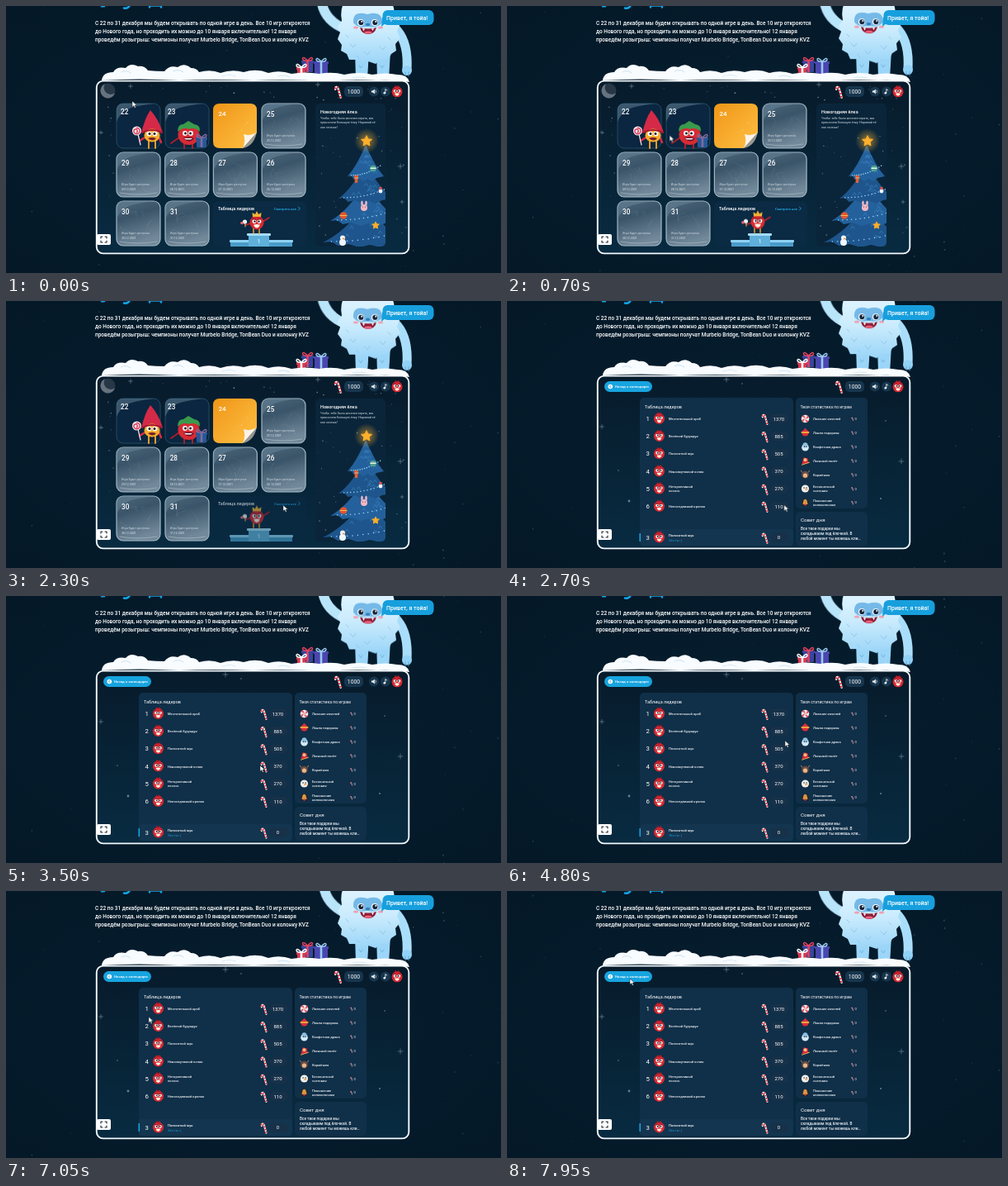
These frames come from a looping animation (600 px wide and 323 px high, 8 s). An HTML page:

```html
<!DOCTYPE html>
<html lang="ru">
<head>
<meta charset="utf-8">
<title>Новогодний календарь</title>
<style>
html, body { margin: 0; width: 100%; height: 100%; overflow: hidden; background: #051a29; }
svg { display: block; width: 100vw; height: 100vh; font-family: Roboto, Inter, sans-serif; }
</style>
</head>
<body>
<svg id="stage" viewBox="0 0 600 323" preserveAspectRatio="none">
  <defs>
    <radialGradient id="page" cx=".5" cy=".5" r=".7">
      <stop stop-color="#061f30"/><stop offset="1" stop-color="#041827"/>
    </radialGradient>
    <linearGradient id="panel" x2="0" y2="1">
      <stop stop-color="#071b2b"/><stop offset="1" stop-color="#082b41"/>
    </linearGradient>
    <linearGradient id="ice" x2=".3" y2="1">
      <stop stop-color="#4d6679"/><stop offset=".4" stop-color="#3a5469"/><stop offset="1" stop-color="#72899a"/>
    </linearGradient>
    <linearGradient id="gold" x2="1" y2="1">
      <stop stop-color="#ef9617"/><stop offset="1" stop-color="#ffc044"/>
    </linearGradient>
    <linearGradient id="fur" x2="0" y2="1">
      <stop stop-color="#e3f6ff"/><stop offset=".5" stop-color="#cbecfd"/><stop offset="1" stop-color="#9bd5f8"/>
    </linearGradient>
    <radialGradient id="glow">
      <stop stop-color="#ffb52e" stop-opacity=".6"/><stop offset="1" stop-color="#ffb52e" stop-opacity="0"/>
    </radialGradient>
    <clipPath id="treeClip"><rect x="375" y="118" width="85" height="173" rx="5"/></clipPath>
  </defs>
</svg>
<script>
const LOOP = 8000, SWITCH = 2650;
const stage = document.getElementById('stage');

let seed = 7;
const rnd = (a = 0, b = 1) => {
  seed = (seed * 16807) % 2147483647;
  return +(a + (b - a) * seed / 2147483647).toFixed(2);
};
const times = (n, fn) => Array.from({ length: n }, (_, i) => fn(i)).join('');

const rect = (x, y, w, h, r, fill, more = '') =>
  `<rect x="${x}" y="${y}" width="${w}" height="${h}" rx="${r}" fill="${fill}" ${more}/>`;
const dot = (x, y, r, fill, more = '') =>
  `<circle cx="${x}" cy="${y}" r="${r}" fill="${fill}" ${more}/>`;
const oval = (x, y, rx, ry, fill) =>
  `<ellipse cx="${x}" cy="${y}" rx="${rx}" ry="${ry}" fill="${fill}"/>`;
const path = (d, fill, more = '') => `<path d="${d}" fill="${fill}" ${more}/>`;
const line = (d, stroke, w = 1) =>
  `<path d="${d}" fill="none" stroke="${stroke}" stroke-width="${w}" stroke-linecap="round" stroke-linejoin="round"/>`;
const text = (x, y, size, str, fill = '#fff', weight = 400, more = '') =>
  `<text x="${x}" y="${y}" font-size="${size}" fill="${fill}" font-weight="${weight}" ${more}>${str}</text>`;
const group = (body, attrs = '') => `<g ${attrs}>${body}</g>`;
const at = (x, y, body, scale = 1) => group(body, `transform="translate(${x} ${y}) scale(${scale})"`);
const spark = (x, y, r = 2.5) =>
  line(`M${x - r} ${y}h${2 * r}M${x} ${y - r}v${2 * r}`, '#7892a3', .6);
const star = (x, y, r, fill) => path('M' + Array.from({ length: 10 }, (_, i) => {
  const a = i * Math.PI / 5 - Math.PI / 2, q = i % 2 ? r * .48 : r;
  return `${(x + q * Math.cos(a)).toFixed(1)} ${(y + q * Math.sin(a)).toFixed(1)}`;
}).join('L') + 'Z', fill, `stroke="${fill}" stroke-linejoin="round"`);
const specks = (n, [x0, x1], [y0, y1], fill, size = .8) => times(n, () =>
  dot(rnd(x0, x1), rnd(y0, y1), rnd(.3, size), fill, `opacity="${rnd(.2, .8)}"`));

const cane = (x, y, s = 1) => {
  const d = 'M1.5 7L-1 -2C-2 -6 -5 -5 -4.4 -2';
  return at(x, y, line(d, '#f7f2f0', 2.2) +
    `<path d="${d}" fill="none" stroke="#e43342" stroke-width="2.2" stroke-dasharray="1.8 1.7"/>`, s);
};

// Round red fruit face, shared by avatars and the podium hero
const face = (x, y, s = 1) => at(x, y,
  dot(0, 0, 6.5, '#d92931') + path('M-3 -5L-2 -8 0 -6 2 -8 3 -5Z', '#b81c29') +
  dot(-2.3, -1, 1.9, '#fff') + dot(2.3, -1, 1.9, '#fff') +
  dot(-1.9, -1, .9, '#1a1420') + dot(1.9, -1, .9, '#1a1420') +
  path('M-3 2Q0 1 3 2Q2 5 0 5Q-2 5 -3 2Z', '#fff3e6') + line('M-4 -3.6L-1 -2.8M4 -3.6L1 -2.8', '#761020', .8), s);

const gift = (x, y, w, h, fill, ribbon) =>
  rect(x, y, w, h, 1, fill) + rect(x + w / 2 - 1.3, y, 2.6, h, 0, ribbon) +
  rect(x - 1, y, w + 2, 3, .6, fill) + rect(x + w / 2 - 1.3, y, 2.6, 3, 0, ribbon) +
  line(`M${x + w / 2} ${y}q-6 -6 -6 -2q1 3 6 2q6 -6 6 -2q-1 3 -6 2`, ribbon, 1.4);

function backdrop() {
  const layer = specks(60, [0, 600], [0, 323], '#5d7c92');
  const intro = [
    'С 22 по 31 декабря мы будем открывать по одной игре в день. Все 10 игр откроются',
    'до Нового года, но проходить их можно до 10 января включительно! 12 января',
    'проведём розыгрыш: чемпионы получат Murbelo Bridge, TonBean Duo и колонку KVZ'
  ];
  return rect(0, 0, 600, 323, 0, 'url(#page)') +
    group(layer + at(0, -323, layer), 'id="snow"') +
    line('M116 .3h3M143 2.5Q148 3.5 150 -1M174 1.5v-2h14v2', '#13a5e5', 2.4) +
    intro.map((s, i) => text(108, 22.5 + i * 10, 6.48, s, '#fff', 500)).join('');
}

function yeti() {
  const eye = x => dot(x, 20, 4, '#fff') + dot(x + .3, 20, 3.1, '#13253f') + dot(x + 1.3, 18.8, 1.1, '#fff');
  const leg = x => path(`M${x} 55L${x + 1} 88H${x + 15}L${x + 17} 55Z`, '#9bd5f8') +
    line(`M${x + 5} 72l2 3 2-3`, '#68b1df', .8);
  return group(
    line('M471 26Q488 42 486 76', '#a9defb', 11) + dot(486, 78, 6, '#92d2f7') +
    line('M484 80v5M488 80v5', '#589ecf', .8) +
    group(line('M384 -4Q388 18 412 28', '#b9e5fb', 12), 'id="arm"') +
    leg(423) + leg(449) +
    path('M412 -10Q404 4 407 18L402 25 405 32 402 40 407 47 406 54 413 58 416 65 424 65 430 70 439 67 448 70 455 65 463 65 467 58 473 54 472 46 478 39 474 31 477 23 471 16Q472 0 464 -10Z', 'url(#fur)') +
    line('M417 46l4 4 3-4M434 55l4 4 3-4M453 49l4 4 3-4M425 60l3 3M463 38l3 3M412 35l3 3', '#86c4e9', .8) +
    path('M421 20Q420 5 438 10Q456 5 456 20Q452 27 438 25Q425 27 421 20Z', '#74b9e8') +
    eye(430) + eye(447) + oval(438.5, 22.5, 2.8, 1.8, '#357eb9') +
    path('M429 26Q439 29 449 26Q447 34 439 34Q431 34 429 26Z', '#8e1c38') +
    oval(439, 32, 4.5, 1.6, '#ef667d') +
    path('M432 27l3 .5 -1.5 3ZM443 27.5l3 -.5 -1.5 3Z', '#fff') +
    oval(424, 26, 3, 1.5, '#f0a0b4') + oval(454, 26, 3, 1.5, '#f0a0b4'), 'id="yeti"') +
    rect(456.5, 5, 62, 18, 6, '#179fdd') + path('M461 20l-6 5 1 -12Z', '#179fdd') +
    text(461, 16.5, 7, 'Привет, я тойа!', '#fff', 500);
}

function snowCap() {
  return gift(359, 66, 13, 14, '#39459d', '#e34260') + gift(374, 67, 16, 15, '#4a46b0', '#9cc9f0') +
    gift(353, 74, 10, 9, '#d8384e', '#fff') +
    path('M116 90Q117 80 130 80Q134 73 145 75Q151 68 160 73Q168 72 172 78Q182 79 192 79Q198 71 208 74Q216 68 224 75Q231 75 234 80Q248 76 260 81Q274 76 288 80Q304 75 318 81Q332 77 346 82Q362 79 380 82Q396 79 410 83Q428 79 444 83Q460 80 474 83Q487 83 489 92Q470 89 450 90Q420 88 390 91Q340 88 300 90Q250 88 210 90Q160 87 116 90Z', '#f8fcff') +
    line('M140 80q6 -3 11 1M203 79q7 -3 12 1M262 85q9 -3 16 0M330 85q8 -2 14 1M420 87q9 -2 16 0', '#d7e8f4', 1.2);
}

function header() {
  return cane(404, 103, 1.1) + rect(410, 97, 23, 13, 5, '#17364e') +
    text(421.5, 106, 6.8, '1000', '#fff', 400, 'text-anchor="middle"') +
    dot(446, 103.5, 6, '#17364e') + path('M443 102.5h1.8l2 -2v6l-2 -2h-1.8Z', '#fff') +
    line('M448 102q1 1.5 0 3', '#fff', .7) +
    dot(460, 103.5, 6, '#17364e') + dot(458.8, 105.3, 1.3, '#fff') + line('M459.8 105v-4.5l2 1.5', '#fff', .8) +
    face(474, 103.8);
}

// Pale ice along the rim of a tile, thicker in the upper left corner
const frost = (x, y) =>
  path(`M${x} ${y + 22}V${y + 8}Q${x} ${y} ${x + 8} ${y}H${x + 45}Q${x + 30} ${y + 2} ${x + 22} ${y + 4}Q${x + 6} ${y + 7} ${x} ${y + 22}Z`, '#6b879b', 'opacity=".5"');

function iceTile(x, y, day) {
  const cracks = times(6, () =>
    line(`M${x + rnd(10, 42)} ${y + rnd(12, 40)}l${rnd(-9, 9)} ${rnd(-9, 9)} ${rnd(-6, 6)} ${rnd(2, 8)}`, 'rgba(190,210,224,.2)', .4));
  return rect(x, y, 53, 54, 8, 'url(#ice)', 'stroke="#a3b7c5" stroke-width="1.2"') +
    frost(x, y) + cracks +
    line(`M${x + 4} ${y + 49}Q${x + 26} ${y + 53} ${x + 49} ${y + 49}`, 'rgba(225,237,245,.35)', 1) +
    text(x + 6, y + 15.5, 8.2, day, '#fff', 500) +
    text(x + 6, y + 39.8, 3.5, 'Игра будет доступна', '#cbd7df') +
    text(x + 6, y + 45.6, 3.5, `${day}.12.2021`, '#e4ebf0');
}

function openTiles() {
  const eyes = (x, y) => dot(x - 3.5, y, 3, '#fff') + dot(x + 3.5, y, 3, '#fff') +
    dot(x - 3, y, 1.5, '#241920') + dot(x + 3, y, 1.5, '#241920');
  const gnome =
    line('M173 163v9M181 163v9', '#e79a29', 2) + line('M170 158L162 163M185 158L188 165', '#d72a42', 2.5) +
    path('M164 154Q168 136 175 126Q185 137 190 153Q178 147 164 154Z', '#d42a48') +
    oval(177, 156.5, 9.5, 8, '#f6ad2c') + eyes(177, 154.5) +
    path('M172 160q5 -2 10 0q-4 5 -10 0Z', '#71202a') +
    line('M165 153Q177 147 189 153', '#a91733', 2.2) +
    line('M160 155L163 168', '#f5e7e4', 1.2) + dot(158.5, 151, 5.5, '#f4e8ec') +
    line('M158.5 147.5a3.6 3.6 0 1 1 -3.6 3.6a2.2 2.2 0 1 1 3.6 1.8', '#dd3855', 1.4);
  const berry =
    line('M210 159L200 166', '#a51f2b', 2) + line('M216 166v6M226 166v6', '#a51f2b', 2) +
    oval(221.5, 156, 13, 12, '#d72b35') +
    path('M208 152Q208 143 215 143L221 139 228 143Q236 144 235 152Q228 146 222 149Q215 146 208 152Z', '#3a9a4c') +
    eyes(220.5, 154) +
    path('M215 160Q221 157 228 160Q223 167 215 160Z', '#62142b') + path('M216 160h10l-2 1.5h-6Z', '#fff') +
    gift(231, 159, 12, 12, '#255896', '#806a9d');
  const rim = 'stroke="#28506c" stroke-width=".9"';
  return rect(134, 118, 53, 54, 8, '#0b2640', rim) + frost(134, 118) + gnome + text(139, 130.5, 8.2, '22', '#fff', 500) +
    rect(193, 118, 53, 54, 8, '#0b2640', rim) + frost(193, 118) + berry + text(196, 130.5, 8.2, '23', '#fff', 500) +
    path('M259 118H296Q304 118 304 126V153L287 172H259Q251 172 251 164V126Q251 118 259 118Z', 'url(#gold)') +
    specks(10, [256, 298], [140, 166], '#fff0c0', .7) +
    path('M304 153Q296 158 288 155Q291 164 287 172Z', '#f9f4e9') +
    path('M304 153L287 172Q300 170 304 153Z', '#d3c9bc', 'opacity=".7"') +
    text(257.5, 132.5, 8, '24', '#fff', 500);
}

function leaderCard() {
  const hero =
    line('M297 263L290 265M311 261L319 256', '#c3212c', 1.5) + line('M300 269v6M307 269v6', '#e79a29', 1.6) +
    face(304, 262, 1.3) + path('M299 255L298.5 250 302 252 304 248 306 252 309.5 250 309 255Z', '#f2b336') +
    dot(289.5, 261, 2.6, '#eef5fb') + dot(286, 262.5, 1.8, '#ed6a72') + line('M290 263v4', '#e8bd67', 1);
  return group(rect(251, 236, 113, 55, 6, '#0b2a43') +
    text(257, 247, 5.4, 'Таблица лидеров', '#fff', 500) +
    text(325, 246.5, 4.2, 'Смотреть все', '#22b2f0', 500) + line('M354.5 243l1.8 2 -1.8 2', '#22b2f0', .8) +
    rect(272, 284, 75, 7, 0, '#4a9cc9') + rect(271, 283, 77, 3, 1, '#8ed2f3') +
    rect(294, 277, 25, 14, 0, '#5fb0da') + rect(292, 275, 29, 3, 1, '#a4dcf6') +
    text(306.5, 287, 8, '1', '#c2e9fb', 500, 'text-anchor="middle"') +
    group(hero, 'id="hero"'), 'id="leaders"');
}

function treeCard() {
  const tiers = [[288, 240, 52], [262, 214, 43], [235, 190, 33], [208, 168, 22]];
  const tree = tiers.map(([y, top, half], i) => {
    const px = k => (436 + half * k).toFixed(1);
    return path(`M436 ${top}Q${px(-.5)} ${y - 14} ${px(-1)} ${y - 2}L${px(-.8)} ${y - 3} ${px(-.65)} ${y + 2} ${px(-.4)} ${y} ${px(-.15)} ${y + 4} ${px(.1)} ${y + 1} ${px(.35)} ${y + 4} ${px(.6)} ${y} ${px(1)} ${y - 2}Q${px(.5)} ${y - 14} 436 ${top}Z`,
      i % 2 ? '#24619c' : '#1e558c') +
      times(11, () => {
        const t = rnd(.35, .9);
        return line(`M${px(rnd(-.6, .6) * t)} ${(top + (y - top) * t).toFixed(1)}l2 -3 2 3`, '#3a82bd', .7);
      }) +
      times(14, k => dot(px((k / 6.5 - 1) * .8), (y - 3 - k * .9 + 3 * Math.sin(k * Math.PI / 13)).toFixed(1), .75, '#9fdcff'));
  }).join('');
  const toys = dot(445, 196.5, 3.8, '#4ea08a') + rect(441.5, 195.5, 7, 1.6, .5, '#e4f2e6') +
    path('M422 205l5 0 -1 9 -3 0Z', '#e2602f') + line('M423 208h4', '#f5c7a0', .8) +
    dot(454, 224, 2.4, '#f3f6f8') + dot(454, 220.5, 1.8, '#e05149') +
    oval(434, 244, 4, 4, '#f4b8c4') + oval(431.5, 238.5, 1.3, 3, '#f4b8c4') + oval(436.5, 238.5, 1.3, 3, '#f4b8c4') +
    dot(432.5, 243, .6, '#532c39') + dot(435.5, 243, .6, '#532c39') +
    dot(409, 253.5, 4.3, '#e2552f') + line('M405 253.5h8', '#f3bd53', 1.2) +
    star(448, 265.5, 4.5, '#f9ae2a') +
    dot(408, 286, 4, '#eef7fd') + dot(408, 280.5, 3, '#eef7fd') + path('M408 280.5l4 1 -4 1Z', '#f28c32');
  const copy = ['Чтобы тебе было веселее играть, мы', 'приносили большую ёлку. Наряжай её', 'как хочешь!'];
  return rect(375, 118, 85, 173, 5, '#0a253a') +
    text(381, 129.5, 5.5, 'Новогодняя ёлка', '#fff', 500) +
    copy.map((s, i) => text(381, 136.5 + i * 5.7, 3.7, s, '#d5e0e7')).join('') +
    group(specks(40, [377, 458], [155, 288], '#a9c4d6', .9) + tree + toys +
      dot(437, 163, 15, 'url(#glow)') + star(437, 163.5, 6.8, '#ffb02c'), 'clip-path="url(#treeClip)"');
}

function calendar() {
  const locked = [[310, 118, 25],
    ...[29, 28, 27, 26].map((d, i) => [134 + i * 58.7, 177, d]),
    [134, 236, 30], [193, 236, 31]];
  return dot(123.5, 102.5, 9, '#273746') +
    path('M120 94.2A9 9 0 1 0 132 105.5Q125 109 120.5 104Q117 99 120 94.2Z', '#66727e') +
    specks(22, [113, 486], [95, 116], '#8ba5b6', .9) + specks(9, [112, 131], [120, 270], '#8ba5b6', .9) +
    specks(9, [463, 486], [120, 290], '#8ba5b6', .9) +
    spark(478, 194, 3) + spark(151, 97) + spark(378, 95) + spark(115, 153, 2) + spark(480, 237, 2) +
    openTiles() + locked.map(a => iceTile(...a)).join('') + leaderCard() + treeCard();
}

function scorePill(y, value) {
  return cane(314, y, .95) + rect(320, y - 5.5, 21, 11, 4.5, '#173149') +
    text(329.5, y + 2.2, 6, value, '#fff', 400, 'text-anchor="middle"');
}

function gameIcon(i, y) {
  const icons = [
    dot(0, 0, 4.8, '#f2e7e7') + times(4, k => group(path('M0 0Q3 -2 2 -4.5L4.5 -2Q3 0 0 0Z', '#e14755'), `transform="rotate(${k * 90})"`)),
    dot(0, 0, 4, '#dc2e3a') + rect(-5, -1.5, 10, 2, .8, '#f0a339') + path('M-2 -3L0 -6 2 -3Z', '#df3040'),
    dot(0, 1, 4.3, '#d3e9f5') + dot(0, -2, 3, '#8ebfdd') + dot(-1, 0, .7, '#1c3144') + dot(1.5, 0, .7, '#1c3144'),
    path('M-4 4L-2 -4 3 -3 4 3Z', '#d82b3e') + dot(0, -1, 2, '#f5bd83') + line('M-4 5L5 2', '#e9b04f', 1),
    dot(0, 0, 4.3, '#6d4d43') + dot(0, 1, 2.6, '#eab889') + line('M-4 -3l-1 -2M4 -3l1 -2', '#aa8168', 1),
    dot(0, 0, 4.6, '#f0f1ed') + dot(-1.4, -1, .8, '#25262a') + dot(1.6, -1, .8, '#25262a') + path('M0 0l4 1 -4 1Z', '#ec8a39'),
    dot(0, 0, 4.5, '#26252c') + path('M-3 2Q-2 -5 0 -4Q2 -5 3 2Z', '#d99843') + dot(0, 2.5, 1.2, '#d64543')
  ];
  return at(361.5, y, icons[i]);
}

function scoreboard() {
  const players = [['Мечтательный краб', 1370], ['Весёлый бурундук', 885], ['Полосатый жук', 505],
    ['Невозмутимый ослик', 370], ['Неторопливый|лосось', 270], ['Непоседливый кролик', 110]];
  const games = ['Лизание качелей', 'Ловля подарков', 'Конфетная драка', 'Лыжный полёт', 'Кормёжка',
    'Бесконечный|снеговик', 'Повышение|колокольчика'];
  const tips = ['Все твои подарки мы', 'складываем под ёлочкой. В', 'любой момент ты можешь кли…'];
  const label = (x, y, s) => {
    const lines = s.split('|');
    return lines.map((t, i) => text(x, y + 1.6 + (i - (lines.length - 1) / 2) * 5, 4.1, t, '#e8eef3', 500)).join('');
  };
  const rows = players.map(([name, score], i) => {
    const y = 142.3 + i * 21.2;
    return text(168.5, y + 2.7, 7.8, i + 1) + face(184.5, y) + label(196, y, name) + scorePill(y, score);
  }).join('');
  const stats = games.map((name, i) => {
    const y = 142.5 + i * 16.9;
    return gameIcon(i, y) + label(371, y, name) + cane(419, y - .2, .32) + text(421.5, y + 1.5, 4.2, '0', '#e6edf2');
  }).join('');
  return spark(266, 95, 3) + spark(115, 152) + spark(478, 194, 3) +
    dot(148, 242, 1.4, '#65808f') + dot(135, 205, .8, '#65808f') + dot(285, 100, .8, '#65808f') +
    dot(459, 145, .8, '#65808f') + dot(453, 239, 1, '#65808f') +
    rect(118, 97, 58, 13, 6.5, '#17a4df') + dot(125.3, 103.5, 2.8, '#fff') +
    line('M126 102.2l-1.5 1.3 1.5 1.3', '#17a4df', .8) + text(131, 105.2, 4.4, 'Назад к календарю', '#fff', 500) +
    rect(161, 117, 186, 179, 5, '#102f48') + text(167, 129.5, 5.5, 'Таблица лидеров') + rows +
    rect(161, 276, 186, 20, 4, '#14354f') + rect(160.5, 281, 1.5, 10, .5, '#18a7e3') +
    text(168.5, 288.5, 7.8, '3') + face(184.5, 286) + text(196, 284.5, 4.1, 'Полосатый жук', '#fff', 500) +
    text(196, 290.5, 4, 'Это ты :)', '#19a5df') + scorePill(286, 0) +
    rect(350, 117, 87, 134, 5, '#102f48') + text(355.5, 129.5, 5.1, 'Твоя статистика по играм') + stats +
    rect(350, 255, 87, 41, 5, '#102f48') + text(356, 267, 6.2, 'Совет дня') +
    tips.map((s, i) => text(356, 276.5 + i * 6, 4.7, s, '#e8eef3', 500)).join('');
}

const frame = (fill, more) => rect(109.8, 90.6, 378.5, 208.8, 8, fill, more);
stage.insertAdjacentHTML('beforeend',
  backdrop() + yeti() + frame('url(#panel)') +
  group(calendar(), 'id="calendar"') + group(scoreboard(), 'id="scores"') + header() +
  frame('none', 'stroke="#f3f8fb" stroke-width="1.9"') + snowCap() +
  rect(110, 276, 17, 13, 2, '#fff') +
  line('M115 281v-2h2M120 279h2v2M122 284v2h-2M117 286h-2v-2', '#17242e', 1.1) +
  path('M0 0V7.2L1.8 5.6 3 8.3 4.3 7.7 3.1 5.1H5.5Z', '#fff', 'id="cursor" stroke="#17222b" stroke-width=".5"'));

const play = (id, frames, duration = LOOP, more = {}) =>
  document.getElementById(id).animate(frames, { duration, iterations: Infinity, ...more });
const move = (x, y) => `translate(${x}px, ${y}px)`;

play('cursor', [[0, 153, 115], [250, 153, 115], [1400, 291, 245], [2200, 336, 247], [SWITCH, 336, 247],
  [3500, 308, 205], [4800, 337, 175], [6150, 206, 216], [7800, 149, 106], [LOOP, 149, 106]]
  .map(([t, x, y]) => ({ offset: t / LOOP, transform: move(x, y), easing: 'ease-in-out' })));

const cut = SWITCH / LOOP;
const toggle = (before, after) => [
  { opacity: before, offset: 0, easing: 'steps(1, end)' },
  { opacity: after, offset: cut, easing: 'steps(1, end)' },
  { opacity: after, offset: 1 }
];
play('calendar', toggle(1, 0));
play('scores', toggle(0, 1));
play('leaders', [{ opacity: 1, offset: 0 }, { opacity: 1, offset: 2050 / LOOP },
  { opacity: .65, offset: 2250 / LOOP }, { opacity: .65, offset: 1 }]);

const sway = { direction: 'alternate', easing: 'ease-in-out' };
play('yeti', [{ transform: move(0, 0) }, { transform: move(0, -1) }], 1000, sway);
play('hero', [{ transform: move(0, 0) }, { transform: move(0, -1) }], 500, sway);
document.getElementById('arm').style.transformOrigin = '412px 28px';
play('arm', [{ transform: 'rotate(-2deg)' }, { transform: 'rotate(2deg)' }], 1000, sway);
play('snow', [{ transform: move(0, 0) }, { transform: move(0, 323) }], LOOP * 4);
</script>
</body>
</html>
```
